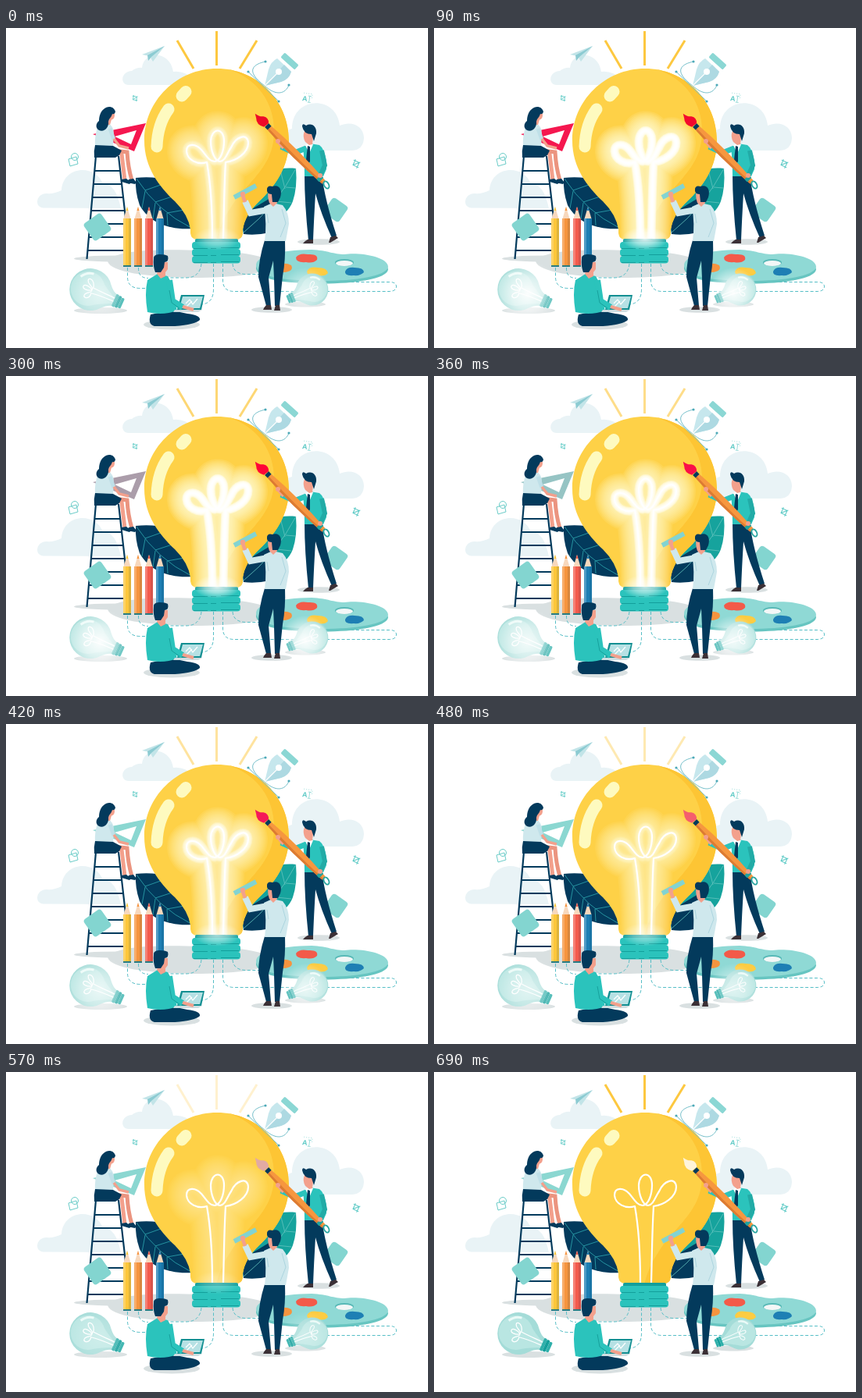
An HTML page with a canvas for the animation above (0.76 s loop, 540 by 410 pixels).

```html
<!DOCTYPE html>
<html lang="en">
<head>
<meta charset="utf-8">
<title>Bright idea</title>
<style>
html, body { margin: 0; width: 100%; height: 100%; overflow: hidden; background: #fff; }
canvas { display: block; width: 540px; height: 410px; }
</style>
</head>
<body>
<canvas id="stage"></canvas>
<script>
const canvas = document.getElementById("stage");
const ctx = canvas.getContext("2d");
const ratio = window.devicePixelRatio || 1;
canvas.width = 540 * ratio;
canvas.height = 410 * ratio;

const LOOP = 760, STEP = 30, LAST = 690;
const NAVY = "#033a5c", TEAL = "#2bc3bc", DEEP = "#139f9b";
const PALE = "#cfe8ed", CLOUD = "#e9f3f6", SHADE = "#d9e0e1", SKIN = "#f3a08c";
const YELLOW = "#fed147", AMBER = "#fdc534", SHINE = "#fefabf";

function fill(color, d) {
  ctx.fillStyle = color;
  ctx.fill(new Path2D(d));
}
function line(color, width, d) {
  ctx.strokeStyle = color;
  ctx.lineWidth = width;
  ctx.stroke(new Path2D(d));
}
function oval(color, x, y, rx, ry = rx) {
  ctx.fillStyle = color;
  ctx.beginPath();
  ctx.ellipse(x, y, rx, ry, 0, 0, Math.PI * 2);
  ctx.fill();
}
function ring(color, width, x, y, rx, ry = rx, angle = 0) {
  ctx.strokeStyle = color;
  ctx.lineWidth = width;
  ctx.beginPath();
  ctx.ellipse(x, y, rx, ry, angle, 0, Math.PI * 2);
  ctx.stroke();
}
function box(color, x, y, w, h, r = 0) {
  ctx.fillStyle = color;
  ctx.beginPath();
  ctx.roundRect(x, y, w, h, r);
  ctx.fill();
}
function at(x, y, degrees, draw, sx = 1, sy = sx) {
  ctx.save();
  ctx.translate(x, y);
  ctx.rotate(degrees * Math.PI / 180);
  ctx.scale(sx, sy);
  draw();
  ctx.restore();
}
function halo(x, y, r, strength) {
  const light = ctx.createRadialGradient(x, y, 0, x, y, r);
  light.addColorStop(0, `rgba(255,255,255,${.95 * strength})`);
  light.addColorStop(.5, `rgba(255,255,255,${.6 * strength})`);
  light.addColorStop(1, "rgba(255,255,255,0)");
  oval(light, x, y, r);
}

// Piecewise linear value, or colour when the stops hold arrays.
function track(time, stops) {
  let i = 0;
  while (i < stops.length - 2 && time > stops[i + 1][0]) i++;
  const [t0, a] = stops[i], [t1, b] = stops[i + 1];
  const k = Math.min(1, Math.max(0, (time - t0) / (t1 - t0)));
  const mix = (p, q) => p + (q - p) * k;
  return Array.isArray(a) ? `rgb(${a.map((p, n) => Math.round(mix(p, b[n])))})` : mix(a, b);
}

const glowStops = [[0, .65], [90, 1], [300, 1], [420, .75], [510, .52], [570, .32], [690, 0]];
const rayStops = [[90, 1], [300, .72], [420, .5], [570, .25], [690, 1]];
const rulerStops = [[90, [245, 23, 79]], [390, [139, 215, 209]]];
const tipStops = [[0, [238, 10, 40]], [300, [255, 5, 55]], [420, [245, 25, 88]],
  [510, [245, 128, 120]], [570, [226, 170, 163]], [690, [254, 244, 218]]];

const FILAMENT = "M264 270C264 235 262 200 257 172C245 176 232 169 231 158C231 147 243 148 250 156" +
  "C256 163 260 171 267 171C275 170 279 156 279 145C279 127 263 127 262 145C262 157 267 171 274 171" +
  "C281 170 283 160 288 153C294 139 309 134 310 147C310 160 295 170 281 172C279 205 279 235 278 270";

function clouds() {
  fill(CLOUD, "M157 73C146 73 146 56 161 55Q168 50 174 51C176 29 210 28 214 56Q228 54 240 66V73Z");
  fill(CLOUD, "M48 230.5C36 230 38 212 52 212Q61 213 71 208C73 176 115 174 124 200Q140 198 147 231Z");
  fill(CLOUD, "M358 157V134Q361 130 366 129C366 87 423 85 427 125C443 118 458 126 458 141Q457 156 443 157Z");
}

function ground() {
  oval(SHADE, 145, 295.5, 58, 4);
  fill(SHADE, "M130 299C140 284 195 283 250 285C315 287 342 294 340 306C330 315 290 320 240 320C180 319 134 313 130 299Z");
  oval(SHADE, 121, 362, 34, 4);
  oval(SHADE, 212, 380, 36, 6.5);
  oval(SHADE, 340, 361, 26, 3.8);
  oval(SHADE, 383, 354, 26, 3.5);
  oval(SHADE, 400, 274, 27, 3.8);
  ctx.setLineDash([4, 2.5]);
  line("#55bec6", 1, "M155.5 307V319Q155.5 333.5 172 333.5H185M169.5 307Q169 320.5 182 320.5M250 302Q248 320 230 320H205" +
    "M265.5 302V333Q266 353 250 354M277.5 302V324Q278 337.5 292 337.5H491Q499.5 337 499.5 331Q499 325.5 491 325.5H430" +
    "M290 302Q291 315.5 308 315.5H330");
  ctx.setLineDash([]);
}

function leaves() {
  fill(NAVY, "M166 192C190 189 217 194 231 208L238 257C208 259 183 249 171 227Q165 210 166 192Z");
  line("#2a9ca8", .9, "M167 193Q194 235 237 256M178 209L174 231M191 224L188 245M206 237L207 253M178 208L212 196M191 223L225 212M206 237L234 232");
  fill("#16a39d", "M371 180C335 176 303 198 300 235L304 264C330 254 359 244 367 222Q373 204 371 180Z");
  fill(NAVY, "M302 242L318 230L338 218V262Q320 266 304 264Z");
  line("#66c5bf", .8, "M371 180Q346 228 304 262M357 206L351 182M346 222L331 190M358 204L370 205M346 222L365 224M332 238L352 241");
}

function mainBulb(rays) {
  ctx.globalAlpha = rays;
  line("#fdc840", 3, "M269.5 4V48M219 16L240 52M321 16L299 52");
  ctx.globalAlpha = 1;
  const outline = "M270 52C321 52 362 93 362 144C362 179 344 203 324 222Q306 239 303 258V263Q302 271 294 271H245Q237 271 236 263V258Q233 239 216 222C196 203 177 179 177 144C177 93 219 52 270 52Z";
  fill(YELLOW, outline);
  ctx.save();
  ctx.clip(new Path2D(outline));
  fill(AMBER, "M278 51C329 64 350 108 341 151C334 184 302 205 287 231Q275 248 269 272H310L370 190V45Z");
  ctx.restore();
  ctx.lineCap = "round";
  line(SHINE, 15, "M225 87L230 81.5");
  line(SHINE, 15, "M208 104Q194 123 193 152");
  ctx.lineCap = "butt";
  box(DEEP, 242, 270, 55, 6, 2);
  for (let y = 274; y < 300; y += 9) {
    box(TEAL, 238, y, 62, 9.5, 4);
    line(DEEP, 1, `M240 ${y + 8.5}H258M262 ${y + 8.5}H269M275 ${y + 7.5}H298`);
  }
}

function filamentGlow(glow) {
  ctx.lineJoin = "round";
  ctx.globalAlpha = .11 * glow;
  for (let w = 50; w > 3; w -= 4) line("#fffbe0", w, FILAMENT);
  ctx.globalAlpha = Math.max(0, glow - .5) * .9;
  for (const w of [11, 9, 7, 5]) line("#fff", w, FILAMENT);
  ctx.globalAlpha = 1;
  line("#fff", 2.2, FILAMENT);
  ctx.lineJoin = "miter";
  at(270, 270, 0, () => halo(0, 0, 30, glow * .9), 1, .5);
}

function smallBulb(glow) {
  fill("#a4dcd8", "M34 -8Q28 -9 22 -16A27 27 0 1 0 22 16Q28 9 34 8Z");
  fill("#b9e6e2", "M34 -2Q25 -6 14 -13A22 22 0 1 0 11 17Q27 7 34 5Z");
  line("#eafaf7", 3, "M-18 -10Q-13 -19 -4 -20");
  box("#2fafaa", 33, -8.5, 4, 17, 1.5);
  box(DEEP, 37, -8, 4, 16, 1.5);
  box("#2fafaa", 41, -7, 4, 14, 1.5);
  halo(13, 0, 42, glow);
  at(33, 0, -90, () => {
    ctx.translate(-270, -270);
    line("#fff", 4, FILAMENT);
  }, .31);
}

function crop() {
  line("#58c8c4", 1, "M-3 -5V3H5M-5 -3H3V5M-3 3L4 -4");
}

function icons() {
  fill("#c2e4e8", "M174 34L203 23L188 43L184 36Z");
  fill("#8ccbd2", "M203 23L181 35L182 42L186 37Z");
  at(165, 90, 10, crop, .75);
  at(448, 174, 25, crop);
  line("#6accc8", 1, "M80 168L90 165L92 174L82 177Z");
  ring("#6accc8", 1, 88, 165, 4.5);
  at(379, 92, 8, () => {
    ctx.fillStyle = "#58c8c4";
    ctx.font = "bold 9px Arial, 'Liberation Sans', sans-serif";
    ctx.fillText("A", 0, 1);
    line("#9cdcda", 1, "M7 -6H11M9 -6V2M7 2H11");
    ctx.setLineDash([1, 2]);
    line("#9cdcda", 1, "M1 -9H12V-3");
    ctx.setLineDash([]);
  });
  line("#74bfca", 1, "M310 56L349 94M332 43C318 46 304 54 331 74C346 88 358 84 362 73");
  for (const [x, y] of [[310, 56], [332, 43], [349, 94], [362, 73]]) oval("#4da9b8", x, y, 1.6);
  fill("#c6e7ed", "M347 39L365 56Q362 66 352 69L331 74L336 53Q339 43 347 39Z");
  fill("#add9e2", "M356 47L365 56Q362 66 352 69L331 74Z");
  oval("#fff", 349, 56, 4);
  line("#fff", 1.2, "M348 57L331 74");
  at(363, 42.5, 42, () => box("#8bd7d4", -12, -4, 24, 8, 1.5));
}

function badge(x, y, size, angle) {
  at(x, y, angle, () => box("#83d5d0", -size / 2, -size / 2, size, size, 4));
}

function ladder() {
  line(NAVY, 2.2, "M115 164L103.5 296M144 164L159 296");
  for (let y = 183; y < 290; y += 17) {
    const k = (y - 164) / 132;
    line(NAVY, 2, `M${115 - 11.5 * k} ${y}H${144 + 15 * k}`);
  }
}

function woman(rulerColor) {
  ctx.fillStyle = rulerColor;
  ctx.fill(new Path2D("M111 136L179 122L164 158ZM139 139L160 149L167 131Z"), "evenodd");
  line(SKIN, 5, "M136 159L148 161Q150 178 152 195");
  line("#eb947f", 5, "M139 157L155 159Q156 178 161 195");
  fill(NAVY, "M148 194L154 193L160 198L158 200L148 197ZM157 194L163 193L167 198L165 200L155 198Z");
  fill(PALE, "M118 125L130 122Q138 125 138 136L137 153L114 152Q113 137 118 125Z");
  fill(NAVY, "M114 150L137 151L148 157L145 163L140 166H113Q112 158 114 150Z");
  fill(SKIN, "M129 114L136 114L133 124L128 124Z");
  oval(SKIN, 135, 111.5, 4, 6);
  fill(NAVY, "M125 104C130 99 138 100 140 107Q139 111 136 110C134 116 132 115 131 120C132 128 125 134 119 131C114 128 115 122 119 119C119 113 121 107 125 104Z");
  line("#bfe0e8", 5, "M133 129L138 143");
  line(SKIN, 3.5, "M138 142L145 151L157 154");
}

function pencils() {
  ["#fcc63b", "#f6943f", "#f35b4d", "#1e7fb4"].forEach((color, i) => {
    const x = 150 + i * 14;
    fill("#f7d8bd", `M${x} 246L${x + 5} 229L${x + 10} 246Z`);
    fill(color, `M${x + 3.5} 234L${x + 5} 229L${x + 6.5} 234Z`);
    box(color, x, 244, 10, 61);
    box("rgba(255,255,255,.22)", x, 244, 3, 61);
    box("rgba(0,40,70,.12)", x + 7, 244, 3, 61);
    box("#277c83", x, 304, 10, 2);
  });
}

function palette() {
  const d = "M320 305C319 291 350 285 391 284C412 285 419 290 433 290C452 287 489 293 489 306C487 318 447 324 405 324C352 324 323 318 320 305Z";
  at(0, 3.5, 0, () => fill("#67c5c1", d));
  fill("#8fd9d5", d);
  oval("#58b9b7", 433, 300.5, 12, 4.5);
  oval("#f3f7f7", 433, 301.5, 11, 3.5);
  fill("#f6943f", "M345 305Q356 299 365 304Q369 312 355 313Q344 313 345 305Z");
  fill("#f35a49", "M371 294Q375 288 386 290Q400 289 398 297Q393 302 384 300Q371 301 371 294Z");
  fill("#fdcc43", "M385 312Q388 305 399 307Q411 307 412 314Q408 319 398 317Q386 320 385 312Z");
  fill("#1e7fb4", "M434 312Q436 306 446 307Q458 307 458 313Q453 318 445 317Q433 318 434 312Z");
}

function painter(tipColor) {
  fill(NAVY, "M382 188H404Q408 220 423 266L417 269Q403 238 396 212Q394 245 393 272H387Q382 224 382 188Z");
  fill("#3b3036", "M386 271H393V276H380Q382 273 386 271ZM415 268L422 266L425 269L415 275H413Z");
  fill(TEAL, "M380 153L389 148L401 150Q407 154 410 170V181L406 190H382Q382 170 380 153Z");
  fill("#fff", "M383 150L387 148L393 149L388 161Z");
  fill(NAVY, "M386 151L389 152L389 171L386 175L384 169Z");
  line(TEAL, 7, "M384 154L369 160L352 152");
  line(SKIN, 4, "M355 154L347 144");
  fill(SKIN, "M382 132H394L392 149L388 150L383 146Q379 139 382 132Z");
  fill(NAVY, "M379 126Q379 121 384 125C391 121 398 126 397 135L394 145L391 136Q381 136 379 126Z");

  at(335, 126, 45, () => {
    fill("#f6973f", "M3 -3.5Q48 -7 101 -3V3Q48 7 3 3.5Z");
    fill("#dc7b32", "M3 1Q52 3 101 1V3Q48 7 3 3.5Z");
    box(NAVY, -2, -3.5, 5, 7);
    box("#1fa39f", 92, -4, 5, 8, 1);
    fill(tipColor, "M-2 -3.5L-3 4Q-12 9 -18 3L-23 0Q-16 -1 -13 -5Q-7 -9 -2 -3.5Z");
  });
  ring("#27a5a1", 1.8, 410, 201, 3, 5, -.5);
  line("#22aba6", 6, "M404 157L408 176L403 187");
  oval(SKIN, 402, 189, 3);
  oval(SKIN, 348, 145, 3);
}

function builder() {
  line("#82d3d1", 6, "M292 217L320 202");
  fill(NAVY, "M331 272H357Q358 296 354 318L350 356H344L343 321L342 298L336 320L339 356H333L323 319Q323 297 331 272Z");
  fill("#3b3036", "M333 355H339L340 361H329Q330 358 333 355ZM345 355H350L351 362H343Z");
  fill(PALE, "M330 229L341 224L354 227Q362 236 362 251L358 273H331Q334 250 330 229Z");
  line(PALE, 8, "M335 233L313 237L306 222");
  line(SKIN, 4.5, "M306 223L302 212");
  oval(SKIN, 303, 213, 3.2);
  line("#acd5df", 1, "M353 232L358 250L351 268M334 238L336 250");
  fill(SKIN, "M336 209L347 210V224L342 229L337 224Q334 216 336 209Z");
  fill(NAVY, "M334 206Q335 201 341 203C350 200 354 208 351 217L348 223H341L340 213Q333 213 334 206Z");
}

function coder() {
  fill(NAVY, "M185 367L213 362L232 366Q249 368 248 374Q242 380 216 382H190Q181 380 185 367Z");
  fill(TEAL, "M181 323L194 315L207 318Q215 330 215 348L219 362Q201 369 181 364Q177 340 181 323Z");
  fill("#138f92", "M224 342H254L250 361H219Z");
  fill("#b6e1e4", "M226 344H252L248 359H222Z");
  line("#fff", 1.2, "M230 353L235 348L239 354L245 347M231 357L238 350");
  fill("#cfdee1", "M216 361H251L246 364H214Z");
  line(TEAL, 8, "M209 323L213 350L226 358");
  line("#17a19c", 1, "M209 336L212 352L222 359");
  line(SKIN, 4, "M226 357L240 361");
  fill(SKIN, "M198 300H207V309L204 313V318L198 321L193 315Z");
  fill(NAVY, "M189 295C189 288 203 290 207 292Q209 299 203 300L202 307L198 313H191Q188 305 189 295Z");
}

function render(time) {
  const glow = track(time, glowStops);
  ctx.setTransform(ratio, 0, 0, ratio, 0, 0);
  ctx.fillStyle = "#fff";
  ctx.fillRect(0, 0, 540, 410);
  clouds();
  ground();
  leaves();
  mainBulb(track(time, rayStops));
  filamentGlow(glow);
  icons();
  ladder();
  woman(track(time, rulerStops));
  badge(117, 255, 27, -35);
  badge(422, 233, 24, 35);
  pencils();
  palette();
  painter(track(time, tipStops));
  at(108, 335, 24, () => smallBulb(glow));
  at(392, 335, -22, () => smallBulb(glow), -.76, .76);
  builder();
  coder();
}

function tick(now) {
  const time = now % LOOP;
  render(Math.min(LAST, Math.floor(time / STEP) * STEP));
  requestAnimationFrame(tick);
}
render(0);
requestAnimationFrame(tick);
</script>
</body>
</html>
```
